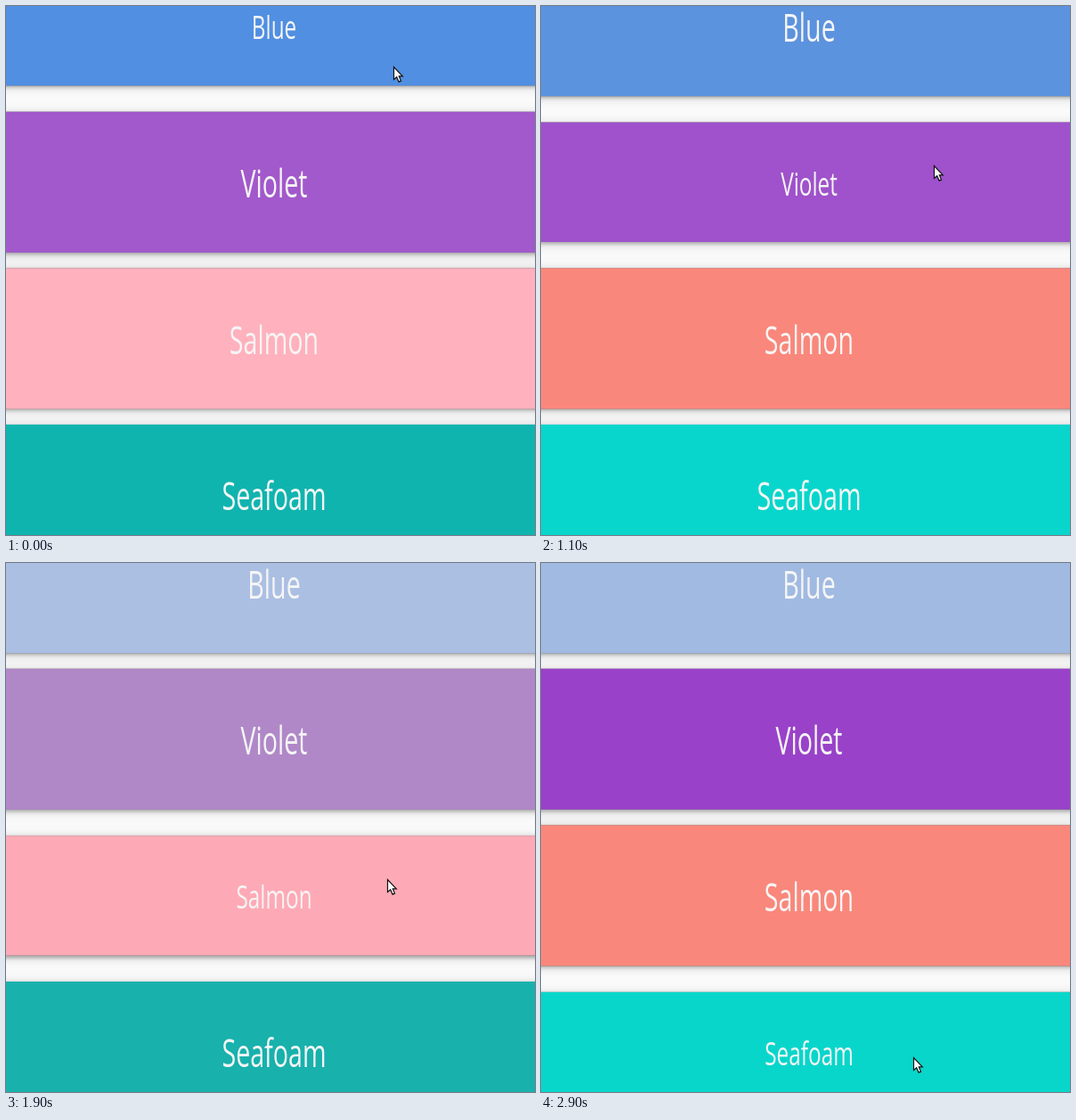
These frames come from a looping animation (594x594 px, 3000 ms). An HTML page with a canvas:

```html
<!DOCTYPE html>
<html lang="en">
<head>
<meta charset="utf-8">
<title>Colour bars</title>
<style>
  html, body { margin: 0; width: 100%; height: 100%; overflow: hidden; background: #fdfdfd; }
  canvas { display: block; }
</style>
</head>
<body>
<canvas id="stage" width="594" height="594"></canvas>
<script>
const ctx = document.getElementById('stage').getContext('2d');
const LOOP = 3000, STEP = 100, RAMP = 200;
const WIDTH = 800, HEIGHT = 158, CENTER = 301, PITCH = 175.6;

// Each bar pulses with its own period; hover is [enter, leave] in ms.
const bars = [
  { label: 'Blue', period: 1200, hover: [-1000, 650],
    stops: [[50, 0x4a8de4], [350, 0x7da8e3], [500, 0xa1bae2], [650, 0xb0c2e3], [800, 0xa1bae2], [950, 0x7da8e0], [1100, 0x5c93de]] },
  { label: 'Violet', period: 1500, hover: [800, 1450],
    stops: [[0, 0xa259cb], [200, 0xb088c8], [400, 0xb088c8], [700, 0xac75ca], [1000, 0xa157cc], [1400, 0x9942c9]] },
  { label: 'Salmon', period: 1800, hover: [1700, 2300],
    stops: [[0, 0xffb1bd], [400, 0xfa94a2], [700, 0xf0a49e], [1100, 0xfa877b], [1700, 0xffb0bb]] },
  { label: 'Seafoam', period: 2100, hover: [2500, 9000],
    stops: [[0, 0x10b4af], [400, 0x09b3ac], [800, 0x08d6ca], [1100, 0x08d6cc], [1700, 0x20aea9]] }
];

const pointer = [
  [0, 435, 68], [500, 435, 68], [850, 440, 150], [1100, 441, 179], [1700, 436, 317],
  [1900, 428, 355], [2200, 423, 368], [2350, 429, 450], [2500, 430, 464], [2900, 418, 555]
];
const arrow = [[0, 0], [0, 14], [3.2, 11.2], [5.6, 16.6], [8, 15.6], [5.8, 10.3], [9.8, 10.3]];

const lerp = (a, b, k) => a + (b - a) * k;
const clamp = k => Math.min(1, Math.max(0, k));
const ease = k => k * k * (3 - 2 * k);

// Finds the two stops around t and the share of the way between them.
function between(stops, t) {
  const i = Math.max(1, stops.findIndex(s => s[0] >= t));
  const [a, b] = [stops[i - 1], stops[i]];
  return [a, b, clamp((t - a[0]) / (b[0] - a[0]))];
}

function colorAt({ stops, period }, t) {
  const first = stops[0], last = stops[stops.length - 1];
  const cycle = [[last[0] - period, last[1]], ...stops, [first[0] + period, first[1]]];
  const [a, b, k] = between(cycle, t % period);
  const channel = shift => Math.round(lerp(a[1] >> shift & 255, b[1] >> shift & 255, k));
  return `rgb(${channel(16)}, ${channel(8)}, ${channel(0)})`;
}

function scaleAt({ hover: [enter, leave] }, t) {
  const ramp = start => ease(clamp((t - start) / RAMP));
  return 1 - 0.15 * (ramp(enter) - ramp(leave));
}

function placed(x, y, scale, paint) {
  ctx.save();
  ctx.translate(x, y);
  ctx.scale(scale, scale);
  paint();
  ctx.restore();
}

function fillBar(color) {
  ctx.fillStyle = color;
  ctx.fillRect(-WIDTH / 2, -HEIGHT / 2, WIDTH, HEIGHT);
}

function castShadow(offset, blur, alpha) {
  ctx.shadowOffsetY = offset;
  ctx.shadowBlur = blur;
  ctx.shadowColor = `rgba(0, 0, 0, ${alpha})`;
  fillBar('#888');
}

function drawLabel(text) {
  ctx.scale(0.65, 1);
  ctx.font = '500 44px "Open Sans", "Noto Sans", sans-serif';
  ctx.textAlign = 'center';
  ctx.fillStyle = '#f5f5f5';
  ctx.fillText(text, 0, 17.3);
}

function drawPointer() {
  ctx.beginPath();
  arrow.forEach(([x, y]) => ctx.lineTo(x, y));
  ctx.closePath();
  ctx.fillStyle = '#fff';
  ctx.strokeStyle = '#111';
  ctx.lineWidth = 1.2;
  ctx.fill();
  ctx.stroke();
}

function draw(t) {
  ctx.fillStyle = '#fdfdfd';
  ctx.fillRect(0, 0, 594, 594);
  const eachBar = paint => bars.forEach((bar, i) =>
    placed(CENTER, 22.2 + i * PITCH, scaleAt(bar, t), () => paint(bar)));
  eachBar(() => {
    castShadow(2, 5, 0.36);
    castShadow(2, 18, 0.14);
  });
  eachBar(bar => {
    fillBar(colorAt(bar, t));
    drawLabel(bar.label);
  });
  const [a, b, k] = between(pointer, Math.min(t, 2900));
  placed(lerp(a[1], b[1], k) + 0.5, lerp(a[2], b[2], k) + 0.5, 1, drawPointer);
}

function frame() {
  draw(Math.floor(performance.now() % LOOP / STEP) * STEP);
  requestAnimationFrame(frame);
}
frame();
</script>
</body>
</html>
```
